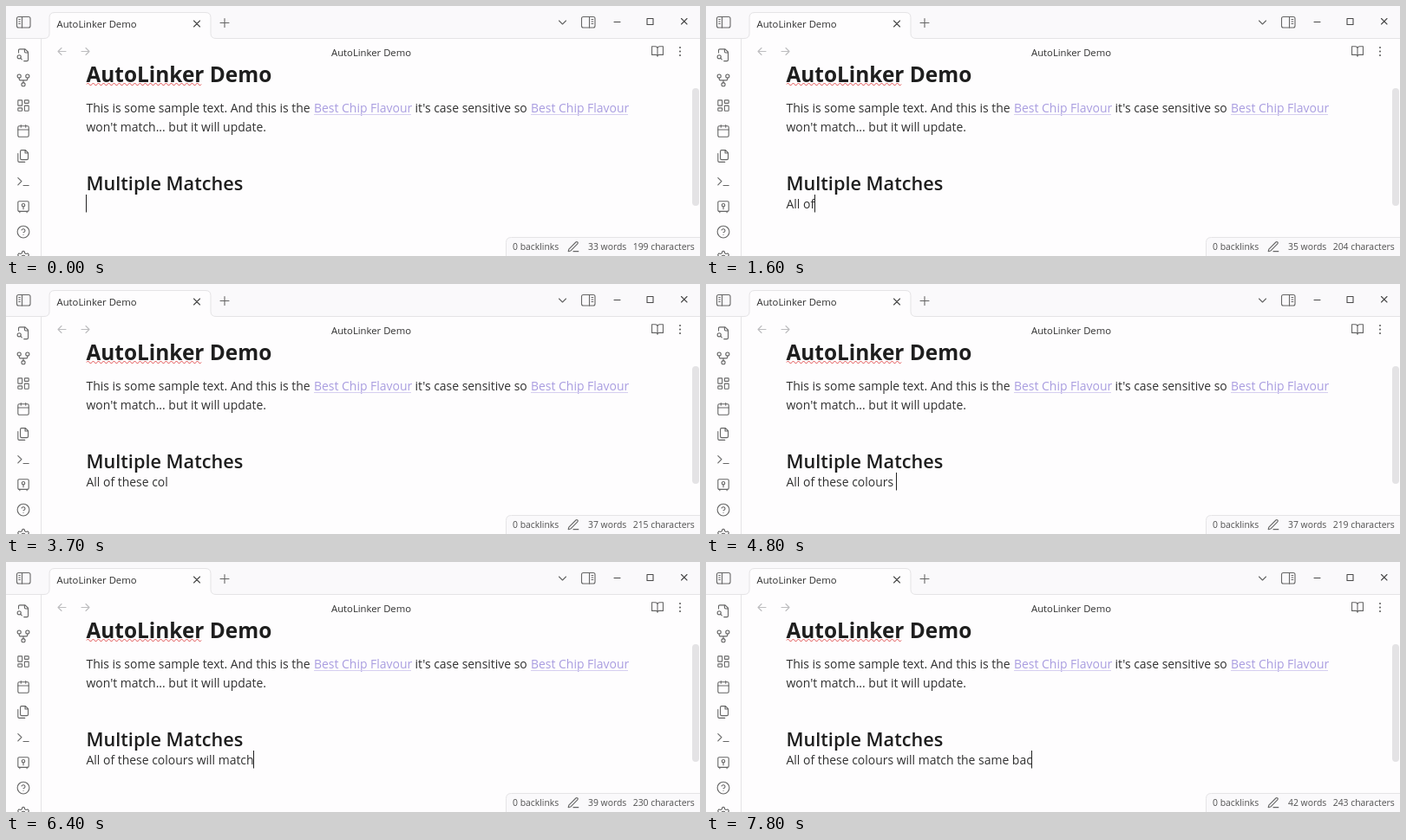
Animation, 800 px wide and 289 px high, one loop 8000 ms. Source, as an HTML page:

```html
<!DOCTYPE html>
<html lang="en">
<head>
<meta charset="utf-8">
<title>Note editor</title>
<style>
  html, body { margin: 0; width: 100%; height: 100%; overflow: hidden; background: #fefdfe; }
  svg { display: block; width: 100vw; height: 100vh; }
  text { font-family: "Open Sans", "Noto Sans", sans-serif; white-space: pre; fill: #303030; }
  .body { font-size: 13.95px; }
  .link { fill: #a99de0; }
  .title { font-size: 11.3px; }
  .status { font-size: 10.4px; fill: #505050; }
  .h1 { font-size: 24.4px; font-weight: 700; fill: #1e1e1e; }
  .h2 { font-size: 21.7px; font-weight: 600; fill: #1e1e1e; }
  .panel { fill: #faf9fb; }
  .line { fill: none; stroke: #e5e4e6; }
  .icon { fill: none; stroke: #666; stroke-linecap: round; stroke-linejoin: round; }
  .icon * { vector-effect: non-scaling-stroke; stroke-width: 1.1px; }
  .pale { stroke: #bdbdbf; }
  .dark { stroke: #4a4a4a; }
</style>
</head>
<body>
<svg viewBox="0 0 800 289">
  <rect width="800" height="289" fill="#fefdfe"/>

  <!-- title bar and tab -->
  <rect class="panel" width="800" height="37"/>
  <path fill="#fefdfe" d="M45 38q5.500-1 5.500-6.500V13.500q0-5.500 5.500-5.500H230q5.500 0 5.500 5.500V31.500q0 5.500 5.500 6.500z"/>
  <path class="line" d="M0 37.500H44q6 0 6-6V13.500q0-6 6-6H230q6 0 6 6V31.500q0 6 6 6H800M40.500 38V289"/>
  <text class="title" x="58.500" y="25">AutoLinker Demo</text>
  <text class="title" x="375" y="57.500">AutoLinker Demo</text>

  <g class="icon">
    <rect x="12.500" y="12.500" width="15.500" height="12.500" rx="2"/>
    <path d="M18.500 12.500v12.500M14.800 15.500h1.500M14.800 18h1.500M14.800 20.500h1.500"/>
    <rect x="663.500" y="12.500" width="15.500" height="12.500" rx="2"/>
    <path d="M672.500 12.500v12.500M675 15.500h1.800M675 18h1.800M675 20.500h1.800"/>
    <path d="M637.500 17l4 4 4-4M247 19.500h10M252 14.500v10"/>
    <path class="dark" d="M216.500 17l7 7M223.500 17l-7 7"/>
    <path class="dark" d="M701 18.500h7M739 14.500h7v7h-7zM778.500 14.500l6.500 6.500M785 14.500l-6.500 6.500"/>
    <path class="pale" d="M69 52.500H60M64 48.500l-4 4 4 4M87 52.500h9M92 48.500l4 4-4 4"/>
  </g>
  <path fill="none" stroke="#666" stroke-width="2.200" stroke-linecap="round" d="M777 48h0M777 52.500h0M777 57h0"/>

  <!-- note -->
  <text class="h1" x="92.500" y="88">AutoLinker Demo</text>
  <path id="wave" fill="none" stroke="#e04848"/>
  <text class="body" x="92.500" y="123">This is some sample text. And this is the</text>
  <text class="body link" x="355" y="123">Best Chip Flavour</text>
  <text class="body" x="471.500" y="123">it's case sensitive so</text>
  <text class="body link" x="605" y="123">Best Chip Flavour</text>
  <path d="M355 125.500H467M605 125.500H717" stroke="#d6cff0"/>
  <text class="body" x="92.500" y="145">won't match... but it will update.</text>
  <text class="h2" x="92.500" y="213">Multiple Matches</text>
  <text class="body" id="typed" x="92.500" y="234"></text>
  <rect id="caret" y="218" width="1" height="20.500" fill="#222"/>
  <rect x="791" y="95" width="8" height="136" rx="4" fill="#e4e3e5"/>

  <!-- status bar -->
  <path class="line" style="fill:#faf9fb" d="M576.500 290V273.500q0-6 6-6H801V290z"/>
  <text class="status" x="584" y="282">0 backlinks</text>
  <text class="status" id="words" x="671" y="282"></text>
  <text class="status" id="chars" x="722.700" y="282"></text>
  <g id="icons" class="icon"></g>
</svg>

<script>
const $ = id => document.getElementById(id);
const LOOP = 8000, FRAME = 100, BLINK = 500, LEFT = 92.5;

// Typing comes in bursts: start time, text, time per key
const BURSTS = [
  [800, "A"], [1000, "ll"], [1400, " of"], [1800, " "], [2100, "these "], [3000, "col"],
  [4100, "ou"], [4600, "rs "], [5100, "will", 50], [5400, " ma"], [6100, "tch"],
  [6600, " the ", 50], [7000, "same ba"], [7800, "c"]
];
// The status bar counts the first key of a burst at once, the others a frame late
const KEYS = BURSTS.flatMap(([start, text, pace = FRAME]) => [...text].map((letter, i) => {
  const at = start + i * pace;
  return { letter, at, countedAt: i ? at + FRAME : at };
}));

// Icon shapes on a 24-unit grid
const path = d => `<path d="${d}"/>`;
const circle = (x, y, r) => `<circle cx="${x}" cy="${y}" r="${r}"/>`;
const box = (x, y, w, h, rx = 1) => `<rect x="${x}" y="${y}" width="${w}" height="${h}" rx="${rx}"/>`;
const icon = (x, y, size, shapes) =>
  `<g transform="translate(${x - size / 2} ${y - size / 2}) scale(${size / 24})">${shapes}</g>`;
const gearSide = path("M12 2a2 2 0 0 1 2.200 2a2 2 0 0 0 1 1.900l.5.250a2 2 0 0 0 2 0a2 2 0 0 1 2.800.700l.3.400a2 2 0 0 1-.7 2.700");

const SIDEBAR = [
  path("M14 2v4a2 2 0 0 0 2 2h4M4 8V4a2 2 0 0 1 2-2h9l5 5v13a2 2 0 0 1-2 2h-5M9.500 19.500L7 17") + circle(5, 15, 3),
  circle(12, 19, 3) + circle(5, 5, 3) + circle(19, 5, 3) + path("M19 8v2q0 2-2 2H7q-2 0-2-2V8M12 12v4"),
  box(3, 3, 7, 9) + box(14, 3, 7, 5) + box(14, 12, 7, 9) + box(3, 16, 7, 5),
  box(3, 4, 18, 18, 2) + path("M16 2v4M8 2v4M3 10h18"),
  path("M15.500 2H9q-2 0-2 2v12q0 2 2 2h9q2 0 2-2V6.500zM3 7.600V20q0 2 2 2h9.500M15 2v5h5"),
  path("M3 18l6-6-6-6M12 19h9"),
  box(3, 3, 18, 17, 2) + circle(12, 9.5, 2.5) + path("M12 12v4M6 20v2M18 20v2"),
  circle(12, 12, 10) + path("M9.100 9a3 3 0 0 1 5.800 1c0 2-2.900 3-2.900 3M12 17h.01"),
  gearSide + `<g transform="matrix(-1 0 0 1 24 0)">${gearSide}</g>` + circle(12, 12, 3)
];
const BOOK = path("M2 3h6a4 4 0 0 1 4 4v14a3 3 0 0 0-3-3H2zM22 3h-6a4 4 0 0 0-4 4v14a3 3 0 0 1 3-3h7z");
const PENCIL = path("M12 20h9M16.500 3.500a2.120 2.120 0 0 1 3 3L7 19l-4 1 1-4z");

$("icons").innerHTML = SIDEBAR.map((shapes, i) => icon(20, 56.7 + 29.2 * i, 16.5, shapes)).join("")
  + icon(751, 52.5, 15.5, BOOK) + icon(654, 278.5, 15.5, PENCIL);
$("wave").setAttribute("d", "M93 90.500q1.500-3 3 0" + "t3 0".repeat(43));

function draw(time) {
  const t = Math.floor(time / FRAME) * FRAME;
  const typed = KEYS.filter(key => key.at <= t);
  const counted = KEYS.filter(key => key.countedAt <= t);
  const textOf = keys => keys.map(key => key.letter).join("");
  const lastKey = typed.length ? typed.at(-1).at : 0;

  $("typed").textContent = textOf(typed);
  const width = typed.length ? $("typed").getComputedTextLength() : 0;
  $("caret").setAttribute("x", Math.round(LEFT + width - 0.3));
  $("caret").setAttribute("visibility", (t - lastKey) % (2 * BLINK) < BLINK ? "visible" : "hidden");
  $("words").textContent = `${33 + textOf(counted).split(" ").filter(Boolean).length} words`;
  $("chars").textContent = `${199 + counted.length} characters`;
}

const start = performance.now();
function tick() {
  draw((performance.now() - start) % LOOP);
  requestAnimationFrame(tick);
}
tick();
</script>
</body>
</html>
```
